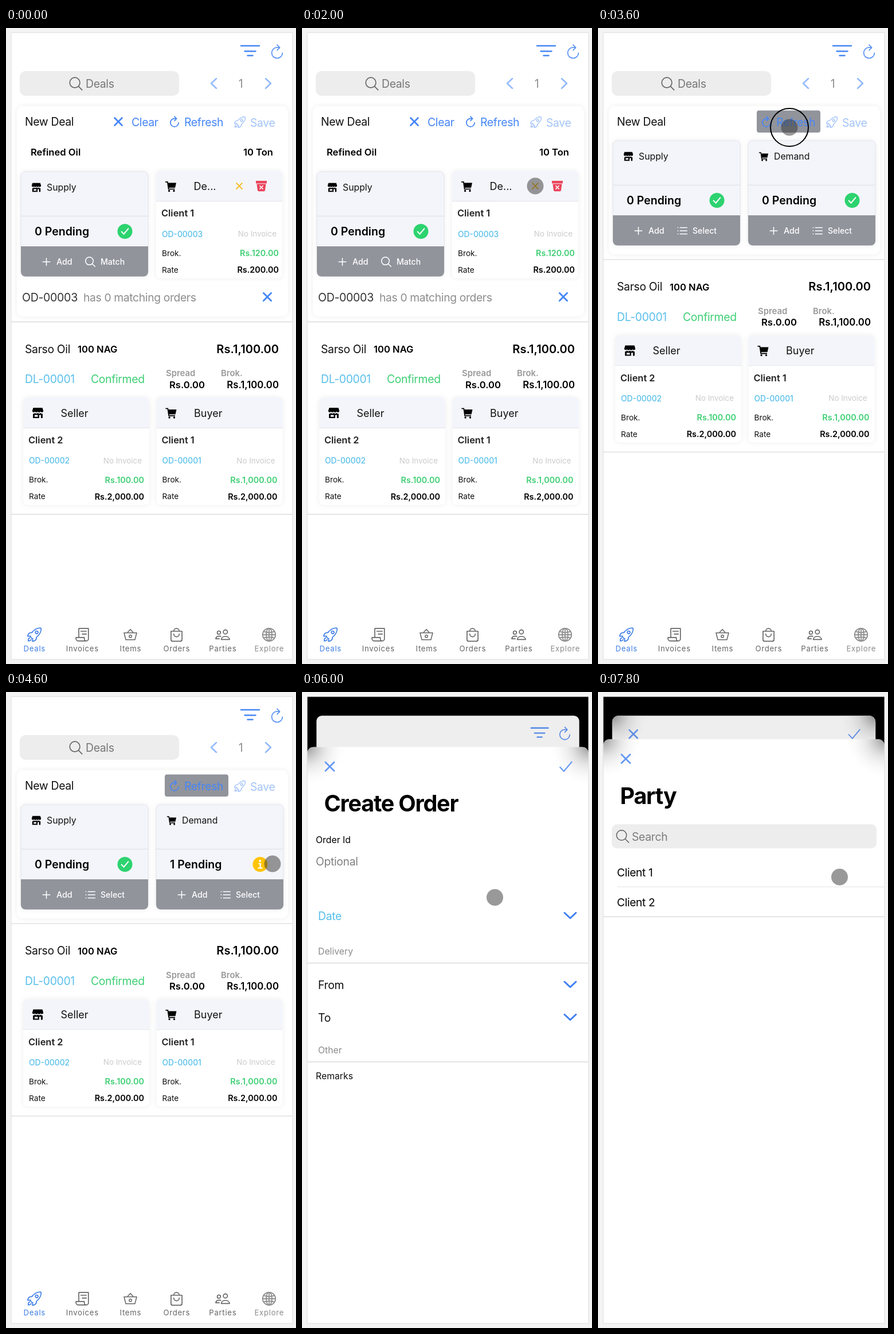
Recreate the animation shown at these times as an HTML page. Size 506 by 1107 pixels, loop 8000 ms.

```html
<!DOCTYPE html>
<html lang="en">
<head>
<meta charset="utf-8">
<title>Deals</title>
<style>
html, body { margin: 0; width: 100%; height: 100%; overflow: hidden; background: #f4f4f4; }
svg { display: block; width: 100%; height: 100%; }
text { font-family: Inter, Roboto, "Liberation Sans", sans-serif; }
.soft { filter: drop-shadow(0 0 4px rgba(0, 0, 0, .07)); }
</style>
</head>
<body>
<svg id="stage" viewBox="0 0 506 1107" preserveAspectRatio="none"></svg>
<script>
const BLUE = '#4686f5', SKY = '#58bfea', GREEN = '#3ecf74', GREY = '#92949c', PALE = '#f4f5fa';
const INK = '#111', DIM = '#8c8c8c', YELLOW = '#ffc409', TAB = '#666';
const LOOP = 8000, STEP = 200, MID = 254.5;

// Icons are drawn around their own centre.
const ICONS = {
  refresh: 'M3-5.2Q3-5.7 0-5.7A7.5 7.5 0 1 0 7.5 1.8M0-9.3 3.75-5.5 0-1.8',
  search: 'M5.8-1.6a7.4 7.4 0 1 1-14.8 0 7.4 7.4 0 1 1 14.8 0M3.8 3.8 9 9',
  rocket: 'M9.6-9.5C5-10.6-.6-7-2.1-4.9L-3.7-3Q-8.7-3.6-9.7 2.3L-5.5 2-5.2 3.7-3.7 5.2-2.3 5.5-2.8 9.7Q3.3 8.7 3 3.7L4.8 2.2C8-1 10.6-6 9.6-9.5ZM5.4-3.4a2 2 0 1 1-4 0 2 2 0 1 1 4 0M-6.9 4.5C-8.6 5-9 6-9 9-6 9-5 8.6-4.5 6.9',
  receipt: 'M-5 4V-9H9V6a3 3 0 0 1-6 0V4H-9V6a3 3 0 0 0 3 3H6M-2-5H6M0-1H6',
  basket: 'M-10-3H10L7.2 8H-7.2ZM-5-3 0-8.5 5-3M2 2.5a2 2 0 1 1-4 0 2 2 0 1 1 4 0',
  bag: 'M-8-5H8V7a2.5 2.5 0 0 1-2.5 2.5h-11A2.5 2.5 0 0 1-8 7ZM-4-5a4 4 0 0 1 8 0M-4-1a4 4 0 0 0 8 0',
  people: 'M7-4a3 3 0 1 1-6 0 3 3 0 1 1 6 0M-3-3a2.4 2.4 0 1 1-4.8 0 2.4 2.4 0 1 1 4.8 0M-2 7C-1.5 1 9.5 1 10 7ZM-5 6H-10C-9.8 2.5-6 1.2-2.6 2.4',
  globe: 'M9 0A9 9 0 1 1-9 0 9 9 0 1 1 9 0M4 0A4 9 0 1 1-4 0 4 9 0 1 1 4 0M-9 0H9M0-9V9M-7.5-4.5Q0-2 7.5-4.5M-7.5 4.5Q0 2 7.5 4.5',
  shop: 'M-8-9H8L9.7-3.4a2.6 2.6 0 0 1-4.9 1 2.6 2.6 0 0 1-4.8 0 2.6 2.6 0 0 1-4.8 0 2.6 2.6 0 0 1-4.9-1ZM-8.4 1.4Q-5.5 1.6-4.8 0-2.8 2.4 0 0 2.8 2.4 4.8 0 5.5 1.6 8.4 1.4V9H-8.4ZM-5.6 3.6V6.8H0V3.6ZM2.4 3.6V9H5.4V3.6Z',
  cart: 'M-9.5-8.5H-5L-4.5-6H9.5L7.6 2.5H-3.3L-3 4H7V5.8H-4.6L-6.4-6.8H-9.5ZM-1.2 8a1.7 1.7 0 1 1-3.4 0 1.7 1.7 0 1 1 3.4 0M7.2 8a1.7 1.7 0 1 1-3.4 0 1.7 1.7 0 1 1 3.4 0',
  cross: 'M-7-7 7 7M7-7-7 7',
  tick: 'M-10 1-3.5 8 10-8',
  down: 'M-10-4.5 0 5 10-4.5',
  plus: 'M-7 0H7M0-7V7',
  list: 'M-4-6H9M-4 0H9M-4 6H9M-8.5-6h.6M-8.5 0h.6M-8.5 6h.6'
};

const icon = (name, x, y, scale, color, width = 1.5) =>
  `<path d="${ICONS[name]}" transform="translate(${x} ${y}) scale(${scale})" fill="none" stroke="${color}" stroke-width="${width}" stroke-linecap="round" stroke-linejoin="round"/>`;
const solid = (name, x, y, scale) =>
  `<path d="${ICONS[name]}" transform="translate(${x} ${y}) scale(${scale})" fill="#000" fill-rule="evenodd"/>`;
const rect = (x, y, w, h, fill, r = 0, more = '') =>
  `<rect x="${x}" y="${y}" width="${w}" height="${h}" rx="${r}" fill="${fill}" ${more}/>`;
const rule = (y, x = 9, color = '#dcdcdc', end = 500) =>
  `<path d="M${x} ${y}H${end}" stroke="${color}" stroke-width="1.3"/>`;
const group = (id, body, more = '') => `<g id="${id}" ${more}>${body}</g>`;

// y is the middle of the capitals.
function label(x, y, str, color = INK, size = 19.4, weight = 400, anchor = 'start', gap = size > 19 ? -.35 : 0) {
  return `<text x="${x}" y="${y + size * .364}" fill="${color}" font-size="${size}" font-weight="${weight}" text-anchor="${anchor}" letter-spacing="${gap}">${str}</text>`;
}
const bold = (x, y, str, size = 16.6, anchor = 'start', color = '#000') =>
  label(x, y, str, color, size, 600, anchor, 0);

function orderCard(x, y, sign, head, client, order, brok, rate, right) {
  return `<g class="soft">${rect(x, y, 220, 187, '#fff', 8)}</g>
    <path d="M${x} ${y + 53}v-45a8 8 0 0 1 8-8h204a8 8 0 0 1 8 8v45Z" fill="${PALE}"/>` +
    rule(y + 53, x, '#e8e9ee', x + 220) +
    solid(sign, x + 25.5, y + 27, 1) + label(x + 65.5, y + 27, head, INK, 18) +
    bold(x + 9, y + 74, client, 16.4, 'start', '#222') +
    label(x + 10, y + 110, order, SKY, 13.8, 500) +
    label(x + right - 4, y + 110, 'No Invoice', '#cbcbcb', 13.4, 400, 'end') +
    label(x + 10, y + 143.5, 'Brok.', INK, 13.7) + bold(x + right, y + 143.5, brok, 14.4, 'end', GREEN) +
    label(x + 10, y + 172.5, 'Rate', INK, 13.7) + bold(x + right, y + 172.5, rate, 14.4, 'end');
}

const okMark = (x, y) => `<circle cx="${x}" cy="${y}" r="13" fill="#2dd36f"/>` + icon('tick', x, y, .58, '#fff', 3.6);
const infoMark = (x, y) => `<circle cx="${x}" cy="${y}" r="13" fill="${YELLOW}"/>
  <path d="M${x - 3} ${y - 1.2}h3.3v7M${x - 4} ${y + 6.3}h8" stroke="#fff" stroke-width="2.2" fill="none"/>
  <circle cx="${x - .3}" cy="${y - 6}" r="1.9" fill="#fff"/>`;

function sideCard(x, y, sign, head, status, action, actionIcon) {
  return `<g class="soft">${rect(x, y, 222, 182, PALE, 8, 'stroke="#e3e4e9"')}</g>` +
    solid(sign, x + 27, y + 27.5, .85) + label(x + 45, y + 27.5, head, INK, 15.8) +
    rule(y + 77.5, x, '#e3e4e9', x + 222) + status +
    `<path d="M${x} ${y + 130}h222v44.500a8 8 0 0 1-8 8h-206a8 8 0 0 1-8-8Z" fill="${GREY}"/>` +
    icon('plus', x + 44.5, y + 157, .9, '#fff', 1.7) + label(x + 62, y + 157, 'Add', '#fff', 14.3, 500) +
    icon(actionIcon, x + 121, y + 157, .92, '#fff', 1.7) + label(x + 139, y + 157, action, '#fff', 14.1, 500);
}
const pending = (x, y, n, mark) => bold(x + 24, y + 104, n + ' Pending', 19.5) + mark(x + 181.5, y + 104);

const tab = (x, name, sign, color, scale = 1.2) =>
  icon(sign, x, 1056, scale, color, 1.4) + label(x + .3, 1080, name, color, 13.2, 400, 'middle', .7);

function pageMarkup() {
  const top =
    `<path d="M410 31H442M416.5 40.5H435.5M421.5 48H430.5" stroke="${BLUE}" stroke-width="2.4" stroke-linecap="round"/>` +
    icon('refresh', 473, 41, 1.25, '#5b93f5', 1.4) + rect(24, 75, 278, 43, '#ededed', 10) +
    icon('search', 122, 97, 1.2, '#666', 1.4) + label(139, 97, 'Deals', '#777') +
    `<path d="M367 88 358 96.5 367 105M453 88 462 96.5 453 105" fill="none" stroke="#93b9f8" stroke-width="2.5" stroke-linecap="round" stroke-linejoin="round"/>` +
    label(409.5, 97, '1', DIM, 19.4, 400, 'middle');

  const bin = `<path d="M436 266h19v4.5h-19ZM437.5 271.5h16l-1.5 11a2 2 0 0 1-2 1.8h-9a2 2 0 0 1-2-1.8Z" fill="#eb445a"/>` +
    icon('cross', 445.5, 277.5, .38, '#fff', 4);
  const matched =
    icon('cross', 196, 163, .92, BLUE, 3) + label(219, 163.5, 'Clear', BLUE) +
    bold(43, 215.5, 'Refined Oil') + bold(466, 215.5, '10 Ton', 16.6, 'end') +
    sideCard(26, 250, 'shop', 'Supply', pending(26, 250, 0, okMark), 'Match', 'search') +
    orderCard(262, 248.5, 'cart', 'De...', 'Client 1', 'OD-00003', 'Rs.120.00', 'Rs.200.00', 214) +
    icon('cross', 407, 275, .7, '#f6c137', 3) + bin +
    label(28, 468.5, 'OD-00003', '#333', 19.6) + label(135, 468.5, 'has 0 matching orders', DIM, 19.3) +
    icon('cross', 456, 468, .95, BLUE, 3);
  const cleared =
    sideCard(26, 196, 'shop', 'Supply', pending(26, 196, 0, okMark), 'Select', 'list') +
    sideCard(262, 196, 'cart', 'Demand',
      group('none', pending(262, 196, 0, okMark)) + group('one', pending(262, 196, 1, infoMark)), 'Select', 'list');
  const buttons =
    rect(277, 143.5, 111, 38.5, GREY, 4, 'id="press"') +
    label(33, 163, 'New Deal') + icon('refresh', 294, 163, .95, BLUE, 1.8) + label(311, 163.5, 'Refresh', BLUE) +
    icon('rocket', 408, 164, .95, '#a3c3fa') + label(426, 165, 'Save', '#a3c3fa');
  const deal =
    rule(511.5) + label(33, 558.5, 'Sarso Oil') + bold(125, 559, '100 NAG') + bold(476, 558.5, 'Rs.1,100.00', 20.1, 'end') +
    label(33, 611, 'DL-00001', SKY) + label(148, 611, 'Confirmed', GREEN) +
    bold(279, 601, 'Spread', 14.9, 'start', '#999') + bold(375, 601, 'Brok.', 14.9, 'start', '#999') +
    bold(347, 620.5, 'Rs.0.00', 16.6, 'end') + bold(476, 620.5, 'Rs.1,100.00', 16.8, 'end') +
    orderCard(30, 643, 'shop', 'Seller', 'Client 2', 'OD-00002', 'Rs.100.00', 'Rs.2,000.00', 211) +
    orderCard(262.5, 643, 'cart', 'Buyer', 'Client 1', 'OD-00001', 'Rs.1,000.00', 'Rs.2,000.00', 211) +
    rule(846.5);
  const tabs = tab(49.5, 'Deals', 'rocket', '#3f7fe8') + tab(133, 'Invoices', 'receipt', TAB) +
    tab(217, 'Items', 'basket', TAB, 1.1) + tab(297.5, 'Orders', 'bag', TAB) +
    tab(378, 'Parties', 'people', TAB) + tab(459, 'Explore', 'globe', DIM, 1.25);
  return rect(9, 8, 491, 1091, '#fff', 0, 'id="paper"') + top +
    `<g class="soft">${rect(19, 136, 473, 366, '#fff', 10, 'id="panel"')}</g>` +
    group('matched', matched) + group('cleared', cleared) + buttons + group('deal', deal) + tabs +
    rect(9, 8, 491, 1091, '#000', 10, 'id="shade" opacity="0"');
}

// Sheets are laid out from their own top edge.
const sheetBase = title =>
  rect(9, 0, 491, 1200, '#fff', 11) +
  rect(9, 0, 100, 72, 'url(#cornerL)', 11) + rect(400, 0, 100, 72, 'url(#cornerR)', 11) +
  icon('cross', 48.5, 34, 1.08, '#6699f3', 2.6) +
  label(38.5, 98, title, '#000', 39.5, 700, 'start', -1.2);
const blueDown = y => icon('down', 468, y, 1, '#3f80f4', 3);

function choice(y, color, arrow) {
  return label(457, y, 'Select', color, 18.6, 400, 'end') + icon('down', 482.5, y - 1, .86, arrow, 2.8);
}
function tail(y, gap) {
  return label(28, y, 'Delivery', DIM, 15.8) + rule(y + 21) +
    label(28, y + 59 + gap, 'From') + blueDown(y + 58 + gap) +
    label(28, y + 116 + gap, 'To') + blueDown(y + 115 + gap) +
    label(28, y + 172 + gap, 'Other', DIM, 15.8) + rule(y + 193 + gap) +
    label(24, y + 217 + gap, 'Remarks', INK, 15.8);
}
function orderMarkup() {
  const head = sheetBase('Create Order') + icon('tick', 460.5, 34, 1.03, '#6699f3', 2) +
    label(24, 161, 'Order Id', '#000', 15.8) + label(24, 199, 'Optional', '#808080');
  const short = label(28, 294, 'Date', SKY) + blueDown(293) + tail(355, 0);
  const names = ['Party', 'Item', 'Unit', 'Quantity', 'Rate/Unit', 'Brok./Qty.'];
  const full = names.map((name, i) => {
    const y = 271 + i * 66.8;
    const field = i > 2 ? rect(266, y - 20.5, 225, 41.5, PALE, 7)
      : i ? choice(y, '#949494', '#222')
      : group('partyOn', choice(y, '#949494', '#222')) + group('partyOff', choice(y, '#c4c4c4', '#a5a5a5'));
    return label(28, y, name, SKY, 19.2) + field;
  }).join('') +
    label(28, 667, 'Date', SKY) + blueDown(666) +
    label(28, 729, 'Type', DIM) + choice(729, '#dedede', '#a5a5a5') +
    label(28, 849, 'Days') + rect(266, 827, 225, 41.5, PALE, 7) + tail(790, 62);
  return head + group('short', short) + group('full', full) + rect(492, 68, 3.2, 858, '#bcbcbc', 1.5, 'id="bar"') +
    rect(9, 0, 491, 1200, '#000', 11, 'id="shade2" opacity="0"');
}
function partyMarkup() {
  return sheetBase('Party') + rect(24, 148, 462, 42, '#ededed', 9) +
    icon('search', 43, 169, 1.18, '#666', 1.3) + label(59, 170, 'Search', '#7c7c7c') +
    label(33, 232, 'Client 1', '#000', 19.2) + rule(257, 33, '#ececec') +
    label(33, 284, 'Client 2', '#000', 19.2) + rule(309);
}

const corner = (id, x) => `<radialGradient id="${id}" gradientUnits="userSpaceOnUse" cx="${x}" cy="0" r="70">
  <stop offset="0" stop-color="#777" stop-opacity=".75"/><stop offset=".45" stop-color="#aaa" stop-opacity=".3"/>
  <stop offset="1" stop-color="#fff" stop-opacity="0"/></radialGradient>`;

const stage = document.getElementById('stage');
stage.innerHTML = `<defs>${corner('cornerL', 9)}${corner('cornerR', 500)}
  <clipPath id="screen"><rect x="9" y="8" width="491" height="1091"/></clipPath></defs>` +
  rect(0, 0, 506, 1107, '#f4f4f4') +
  group('view', rect(9, 8, 491, 1091, '#000') + group('page', pageMarkup()) +
    group('order', orderMarkup()) + group('party', partyMarkup()), 'clip-path="url(#screen)"') +
  rect(9, 8, 491, 1091, 'none', 0, 'stroke="#dcdcdc"') +
  `<circle id="ring" fill="none" stroke="#000" stroke-width="2"/><circle id="dot" r="14.5" fill="#333"/>`;

const part = {};
stage.querySelectorAll('[id]').forEach(el => part[el.id] = el);
const set = (id, name, value) => part[id].setAttribute(name, value);
const show = (id, on) => set(id, 'display', on ? 'inline' : 'none');
const mix = (a, b, k) => a + (b - a) * k;
const ramp = (t, from, to) => Math.min(1, Math.max(0, (t - from) / (to - from)));
const settle = (t, start) => t < start ? 0 : 1 - Math.exp(-.0115 * (t - start));

const PATH = [[2000, 407, 275], [2800, 302, 151], [3200, 334, 173], [4200, 334, 173], [4600, 465, 299],
  [4800, 471, 326], [5000, 390, 352], [5200, 336.5, 357.5], [6800, 336.5, 357.5], [7400, 417.5, 322], [7800, 421.5, 322]];

function cursorAt(t) {
  if (t <= PATH[0][0]) return PATH[0].slice(1);
  const i = PATH.findIndex(p => p[0] >= t);
  if (i < 0) return PATH[PATH.length - 1].slice(1);
  const [a, b] = [PATH[i - 1], PATH[i]], k = ramp(t, a[0], b[0]);
  return [mix(a[1], b[1], k), mix(a[2], b[2], k)];
}

function update(t) {
  const clear = t >= 2200, counted = t >= 4200, filled = t >= 6200;
  show('matched', !clear);
  show('cleared', clear);
  set('panel', 'height', clear ? 258 : 366);
  set('deal', 'transform', `translate(0 ${clear ? -108.4 : 0})`);
  show('press', t >= 3600);
  show('none', !counted);
  show('one', counted);

  const first = settle(t, 5718), second = settle(t, 7483);
  set('page', 'transform', `translate(${MID} ${8 + 34.5 * first}) scale(${1 - .069 * first}) translate(${-MID} -8)`);
  set('paper', 'rx', first ? 10 : 0);
  set('shade', 'opacity', .07 * first);
  show('order', first > 0);
  set('order', 'transform', `translate(${MID} ${mix(mix(1099, 55, first), 41, second)}) scale(${1 - .066 * second}) translate(${-MID} 0)`);
  set('shade2', 'opacity', .07 * second);
  show('short', !filled);
  show('full', filled);
  show('bar', t >= 6400 && !second);
  show('partyOn', t < 7400);
  show('partyOff', t >= 7400);
  show('party', second > 0);
  set('party', 'transform', `translate(0 ${mix(1099, 55, second)})`);

  const [x, y] = cursorAt(t);
  const ringStart = t < 2000 ? 1200 : 3200, ringEnd = t < 2000 ? 1800 : 3600;
  for (const id of ['dot', 'ring']) {
    set(id, 'cx', x);
    set(id, 'cy', y);
  }
  set('dot', 'opacity', .5 * ramp(t, 600, 1000));
  show('ring', t >= ringStart && t <= ringEnd);
  set('ring', 'r', mix(20, 33, ramp(t, ringStart, ringEnd)));
}

function frame(now) {
  update(Math.floor(now % LOOP / STEP) * STEP);
  requestAnimationFrame(frame);
}
update(0);
requestAnimationFrame(frame);
</script>
</body>
</html>
```
